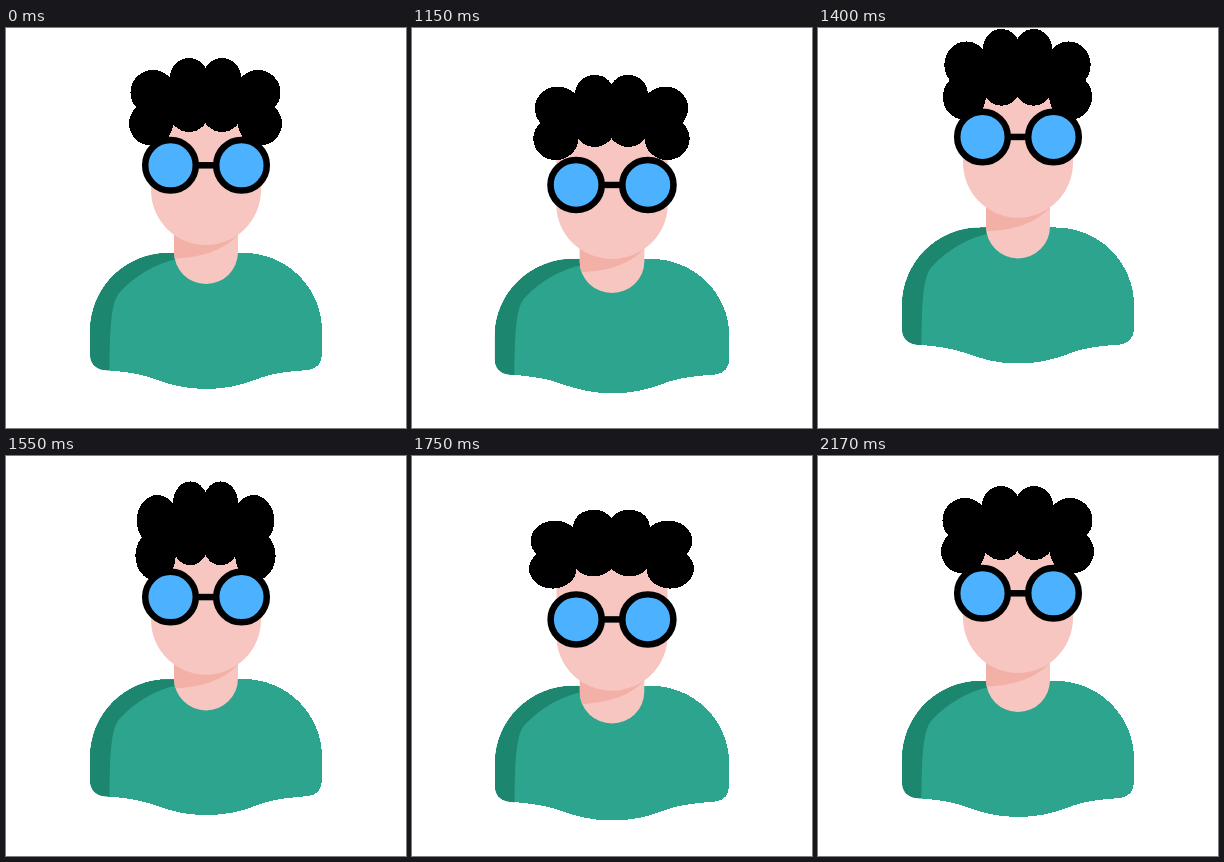
An HTML page that plays this animation: 400x400 px, repeating every 2200 ms.

```html
<!DOCTYPE html>
<html lang="en">
<head>
<meta charset="utf-8">
<title>Bouncing avatar</title>
<style>
  html, body { margin: 0; width: 100%; height: 100%; overflow: hidden; background: #fff; }
  svg { display: block; width: 100%; height: 100%; }
  .hard { shape-rendering: crispEdges; }
</style>
</head>
<body>
<svg viewBox="0 0 400 400">
  <defs>
    <path id="torso" d="M84 303A78 78 0 0 1 162 225H238A78 78 0 0 1 316 303V326C316 335 311 341 302 342C276 344 264 346 250 351.5S220 361 200 361S164 356.5 150 351.5S124 344 98 342C89 341 84 335 84 326Z"/>
    <path id="throat" d="M168 185V224a32 32 0 0 0 64 0V185Z"/>
    <clipPath id="inTorso"><use href="#torso"/></clipPath>
    <clipPath id="inThroat"><use href="#throat"/></clipPath>
  </defs>
  <g id="figure">
    <use class="hard" href="#torso" fill="#2ca48e"/>
    <path clip-path="url(#inTorso)" fill="#1c866f" d="M80 220V350H103.5C103.5 300 105 273 114 264C130 247 150 235 172 231V220Z"/>
    <g id="neck">
      <use href="#throat" fill="#f7c6c0"/>
      <g clip-path="url(#inThroat)">
        <path id="shade" fill="#f3b0a6" d="M160 170H240V200L232 207C215 224 195 230 160 231Z"/>
      </g>
    </g>
    <path id="head" fill="#f7c6c0" d="M145 88V162a55 55 0 0 0 110 0V88Z"/>
    <g id="hair" class="hard">
      <rect x="147" y="55" width="105" height="37"/>
      <circle cx="183" cy="49" r="19"/><circle cx="216" cy="49" r="19"/>
      <circle cx="147" cy="64.5" r="22.5"/><circle cx="252" cy="64.5" r="22.5"/>
      <circle cx="145" cy="95.5" r="22"/><circle cx="254" cy="95.5" r="22"/>
      <circle cx="183" cy="84" r="20"/><circle cx="216" cy="84" r="20"/>
    </g>
    <g id="glasses" fill="#4cb2ff" stroke="#000" stroke-width="6.5">
      <path d="M190 137.3H210"/>
      <circle cx="164.5" cy="137.3" r="25.3"/><circle cx="235.5" cy="137.3" r="25.3"/>
    </g>
  </g>
</svg>
<script>
const LOOP = 2200;

// Swings between turning points [time, value] along half cosine waves
const swing = (...points) => t => {
  const next = points.findIndex(p => p[0] > t);
  if (next <= 0) return next ? points.at(-1)[1] : points[0][1];
  const [t0, from] = points[next - 1], [t1, to] = points[next];
  return from + (to - from) * (1 - Math.cos(Math.PI * (t - t0) / (t1 - t0))) / 2;
};

const bodyDrop = swing([990, 0], [1070, 10], [1380, -26], [1660, 10], [1850, -4], [2070, 2], [2170, 0]);
const headLag = swing([1020, 0], [1100, 14], [1420, -3], [1740, 21], [1900, -.5], [2100, 0]);
const hairStretch = swing([1000, 0], [1050, .11], [1230, -.1], [1540, .135], [1740, -.09], [1940, 0]);

const place = (id, value) => document.getElementById(id).setAttribute("transform", value);
const shift = (id, y) => place(id, `translate(0 ${y})`);
const scaleAt = (id, x, y, dy, sx, sy) =>
  place(id, `translate(${x} ${y + dy}) scale(${sx} ${sy}) translate(${-x} ${-y})`);

function draw() {
  const t = performance.now() % LOOP;
  const drop = bodyDrop(t), lag = headLag(t), tall = 1 + hairStretch(t);
  const squash = Math.max(0, drop) * .0027;
  const chin = lag * .63, neck = Math.max(0, lag - 5) * .45;
  scaleAt("figure", 200, 361, drop, 1 + squash, 1 - squash);
  shift("neck", neck);
  shift("shade", chin - neck);
  shift("head", chin);
  shift("glasses", lag);
  scaleAt("hair", 199.5, 77, chin, tall ** -.7, tall);
  requestAnimationFrame(draw);
}
draw();
</script>
</body>
</html>
```
